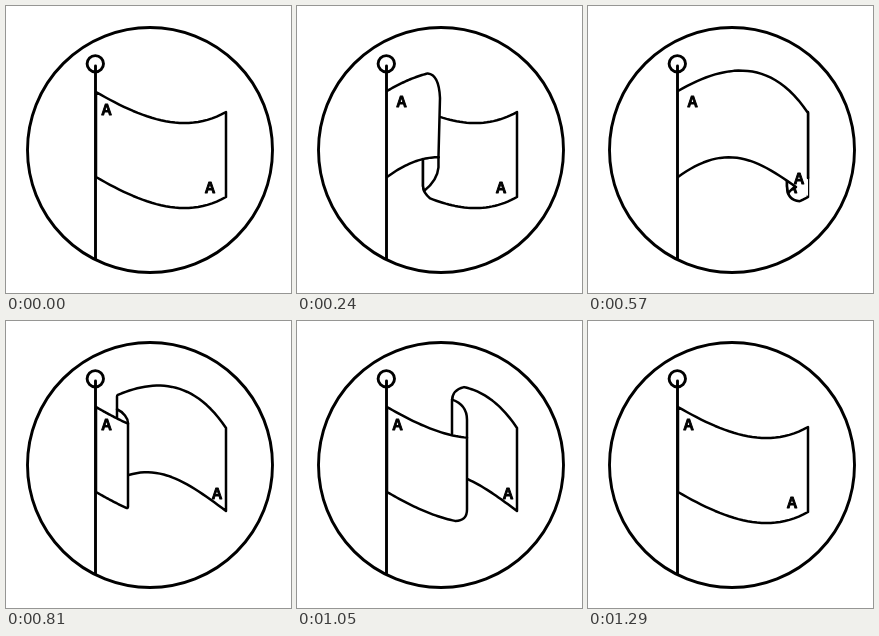
An HTML page with a canvas for the animation above (1.32 s loop, 285 by 287 pixels).

```html
<!DOCTYPE html>
<html lang="en">
<head>
<meta charset="utf-8">
<title>Waving flag</title>
<style>
  html, body { margin: 0; width: 100%; height: 100%; overflow: hidden; background: #fff; }
  canvas { display: block; width: 285px; height: 287px; }
</style>
</head>
<body>
<canvas id="stage"></canvas>
<script>
const W = 285, H = 287, LOOP = 1320, STEP = 30, HALF = 650;
const POLE = 90, END = 220;
const canvas = document.getElementById('stage');
const ctx = canvas.getContext('2d');
const dpr = window.devicePixelRatio || 1;
canvas.width = W * dpr;
canvas.height = H * dpr;

// Cubic edges of the flag, bulging up or sagging down
const upTop = [90, 85, 143, 54, 186, 56, 220, 107];
const upLow = [90, 171, 141, 134, 172, 154, 220, 190];
const sagTop = [90, 86, 140, 115, 181, 128, 220, 106];
const sagLow = sagTop.map((v, i) => i % 2 ? v + 85 : v);

// Letters: x of the centre, y of the baseline
const upMarks = [[104.5, 100.5], [211, 177.5]];
const sagMarks = [[100.5, 108.5], [204, 186.5]];

// Fold position over time: right and left side of each of the two waves
const rise = {
  r: [[0, 90], [13, 90], [240, 143], [360, 171], [570, 220]],
  l: [[0, 90], [70, 90], [240, 126], [360, 149], [570, 199], [650, 220]]
};
const fall = {
  r: [[650, 90], [810, 122], [1050, 170], [1270, 220]],
  l: [[650, 90], [695, 90], [810, 111], [1050, 155], [1285, 220]]
};

function track(keys, t) {
  let [t0, v0] = keys[0];
  for (const [t1, v1] of keys) {
    if (t <= t1) return t1 === t0 ? v1 : v0 + (v1 - v0) * (t - t0) / (t1 - t0);
    [t0, v0] = [t1, v1];
  }
  return v0;
}

function bez(c, k, t) {
  const s = 1 - t;
  return s * s * s * c[k] + 3 * s * s * t * c[k + 2] + 3 * s * t * t * c[k + 4] + t * t * t * c[k + 6];
}

function yAt(c, x) {
  let a = 0, b = 1;
  for (let i = 0; i < 22; i++) {
    const m = (a + b) / 2;
    if (bez(c, 0, m) < x) a = m; else b = m;
  }
  return bez(c, 1, a);
}

function edge(p, c, x0, x1) {
  const n = 28;
  for (let i = 0; i <= n; i++) {
    const x = x0 + (x1 - x0) * i / n;
    p.lineTo(x, yAt(c, x));
  }
}

function paint(p) {
  ctx.fill(p);
  ctx.stroke(p);
}

function letter([x, y]) {
  ctx.save();
  ctx.fillStyle = '#000';
  ctx.lineWidth = 0.9;
  ctx.fillText('A', x, y);
  ctx.strokeText('A', x, y);
  ctx.restore();
}

function marks(list, clip) {
  ctx.save();
  ctx.clip(clip);
  list.forEach(letter);
  ctx.restore();
}

function flat(top, low, list) {
  const p = new Path2D();
  edge(p, top, POLE, END);
  edge(p, low, END, POLE);
  p.closePath();
  paint(p);
  list.forEach(letter);
}

// The bulge pushes the sag away to the right
function drawRise(r, l) {
  const a = Math.min(16, (r - POLE) * 0.23, (END - r) * 0.5);
  const b = Math.min(16, (l - POLE) * 0.2, (END - l) * 0.6);
  const lean = a / 8;
  const lowL = yAt(sagLow, l);

  const back = new Path2D();
  edge(back, sagTop, END, l);
  back.lineTo(l, Math.min(180, lowL - b));
  back.quadraticCurveTo(l, lowL - 5 * b / 12, l + b, yAt(sagLow, l + b));
  edge(back, sagLow, l + b, END);
  back.closePath();
  paint(back);
  marks(sagMarks, back);

  const cy = Math.min(172, yAt(upLow, r) + 10);
  const endY = Math.min(185 + Math.max(0, l - 175) / 10, lowL - 2);
  const curl = new Path2D();
  curl.moveTo(r - lean, Math.min(cy, yAt(upLow, r - lean)));
  curl.lineTo(r - lean, cy);
  curl.bezierCurveTo(r - lean - 1, cy + a, l + 6, 181, l + 1, endY);
  curl.lineTo(l, Math.min(180, endY));
  curl.lineTo(l, yAt(upLow, l));
  paint(curl);

  const top = yAt(upTop, r - a);
  const front = new Path2D();
  edge(front, upTop, POLE, r - a);
  front.quadraticCurveTo(r - a / 12, top + a / 12, r, yAt(upTop, r) + 2.2 * a);
  front.lineTo(r - lean, Math.min(cy, yAt(upLow, r - lean)));
  const fill = new Path2D(front);
  edge(fill, upLow, r - lean, POLE);
  fill.closePath();
  ctx.fill(fill);
  ctx.stroke(front);
  const hem = new Path2D();
  edge(hem, upLow, POLE, r - lean - 0.4 * Math.max(0, r - 190));
  ctx.stroke(hem);
  marks(upMarks, fill);
}

// The sag follows and covers the bulge
function drawFall(r, l) {
  const c = Math.max(0, Math.min(12, (l - 108) * 0.3, (END - l) * 0.5));
  const d = Math.max(0, Math.min(12, (r - 115) * 0.25, (END - r) * 0.5));
  const topL = yAt(upTop, l);

  const back = new Path2D();
  edge(back, upLow, END, l);
  back.lineTo(l, topL + 1.3 * c);
  back.quadraticCurveTo(l, topL + c / 3, l + c, yAt(upTop, l + c));
  edge(back, upTop, l + c, END);
  back.closePath();
  paint(back);
  marks(upMarks, back);

  const y0 = topL + 14;
  const y1 = Math.min(yAt(sagTop, r), yAt(upTop, r) + 32);
  const curl = new Path2D();
  curl.moveTo(l, y0);
  curl.bezierCurveTo(l + (r - l) * 0.6, y0 + 3, r, y0 + 9, r, y1);
  curl.lineTo(r, yAt(sagTop, r));
  ctx.stroke(curl);

  const lowR = yAt(sagLow, r);
  const front = new Path2D();
  edge(front, sagTop, POLE, r);
  front.lineTo(r, lowR - 1.1 * d);
  front.quadraticCurveTo(r, lowR - d / 8, r - d, yAt(sagLow, r - d));
  edge(front, sagLow, r - d, POLE);
  front.closePath();
  paint(front);
  marks(sagMarks, front);
}

function drawFlag(t) {
  const rising = t < HALF;
  const wave = rising ? rise : fall;
  const r = track(wave.r, t), l = track(wave.l, t);
  const done = l > 218;
  if (r > 91 && !done) (rising ? drawRise : drawFall)(r, l);
  else if (rising === done) flat(upTop, upLow, upMarks);
  else flat(sagTop, sagLow, sagMarks);
}

function circle(x, y, r) {
  ctx.beginPath();
  ctx.arc(x, y, r, 0, Math.PI * 2);
  ctx.stroke();
}

function draw(t) {
  ctx.setTransform(dpr, 0, 0, dpr, 0, 0);
  ctx.fillStyle = '#fff';
  ctx.fillRect(0, 0, W, H);
  ctx.strokeStyle = '#000';
  ctx.lineCap = ctx.lineJoin = 'round';
  ctx.textAlign = 'center';
  ctx.font = '600 14.5px Inter, sans-serif';
  ctx.lineWidth = 2.5;
  drawFlag(t);
  ctx.lineWidth = 2.9;
  circle(144, 144, 122.5);
  circle(89.3, 57.8, 8.2);
  ctx.beginPath();
  ctx.moveTo(89.5, 60);
  ctx.lineTo(89.5, 252.5);
  ctx.stroke();
}

const start = performance.now();
function tick() {
  const t = (performance.now() - start) % LOOP;
  draw(Math.floor(t / STEP) * STEP);
  requestAnimationFrame(tick);
}
tick();
</script>
</body>
</html>
```
